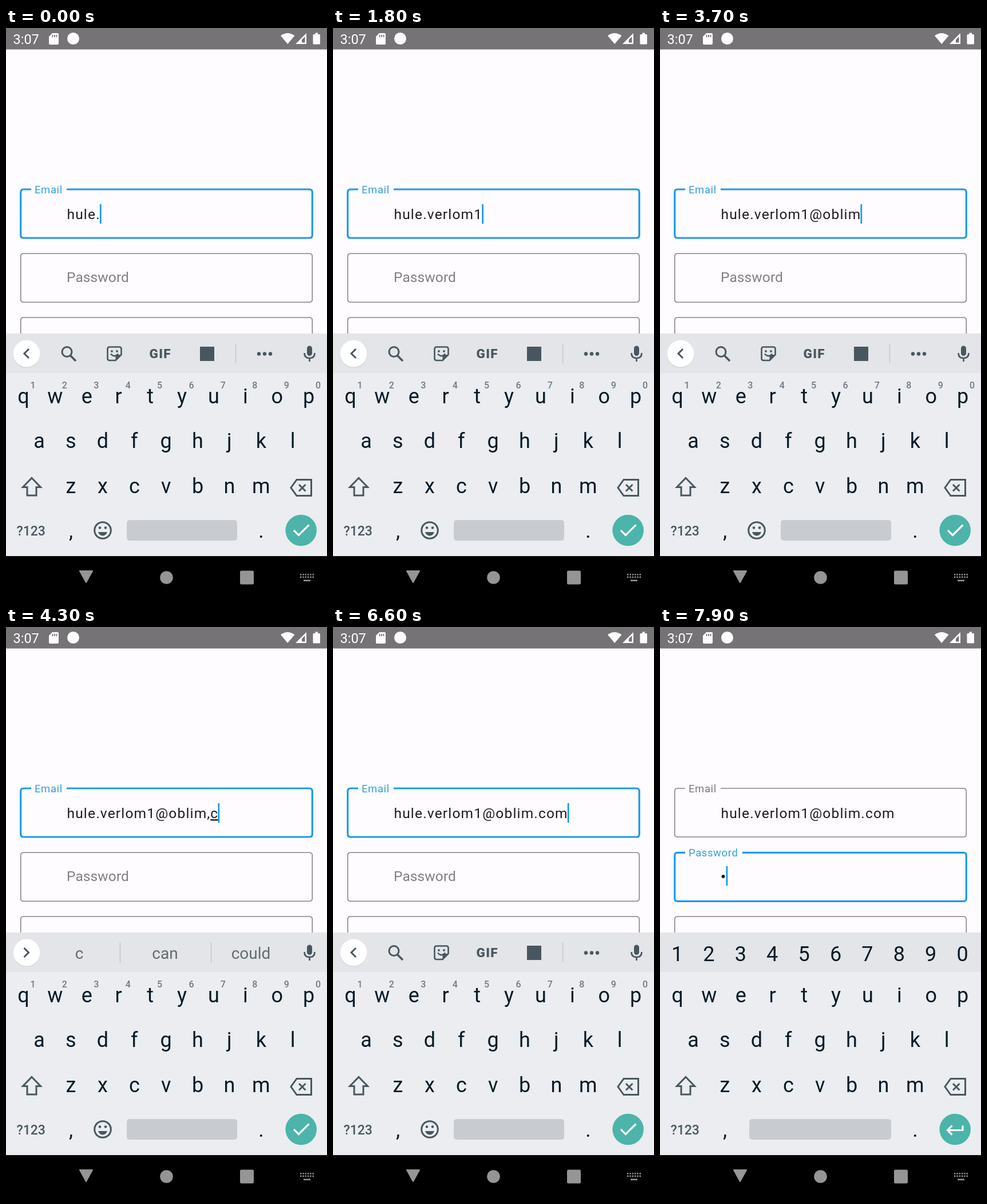
These frames come from a looping animation (561x998 px, 8000 ms). An HTML page:

```html
<!DOCTYPE html>
<html lang="en">
<head>
<meta charset="utf-8">
<title>Sign-in form</title>
<style>
  html, body { margin: 0; width: 100%; height: 100%; overflow: hidden; background: #fefcff; }
  svg { display: block; width: 561px; height: 998px; font-family: Roboto, sans-serif; }
  .mid { text-anchor: middle; }
  .key { font-size: 36px; fill: #061b27; }
  .hint { font-size: 16px; font-weight: 500; fill: #707a80; }
  .word { font-size: 28px; fill: #626b70; }
  .icon { fill: #48575f; }
  .line { fill: none; stroke: #48575f; stroke-width: 3; }
  .rule { stroke: #c5c9cc; stroke-width: 1.6; }
  .typed { font-size: 24.5px; letter-spacing: 1.17px; fill: #1d1b1f; }
  .label { font-size: 18.4px; letter-spacing: .65px; }
  .comp { text-decoration: underline; text-decoration-thickness: 1.5px; }
</style>
</head>
<body>
<svg id="stage" viewBox="0 0 561 998">
  <rect width="561" height="998" fill="#fefcff"/>

  <g id="status" fill="#fff">
    <rect width="561" height="37.5" fill="#757375"/>
    <text x="12.5" y="27.5" font-size="23.5">3:07</text>
    <path d="M81 9H90Q92 9 92 11V27Q92 29 90 29H77Q75 29 75 27V15Z"/>
    <path d="M81.5 12v4M85 12v4M88.5 12v4" stroke="#757375" stroke-width="1.8"/>
    <circle cx="117.5" cy="18.5" r="10.5"/>
    <path d="M480 13.5Q492 4.500 504.500 13.500L492.200 28Z"/>
    <path d="M525 9V28H506Z"/>
    <path d="M522.500 15V25.500H517V20.500Z" fill="#757375"/>
    <path d="M540.500 8.500h4.500v2.500h2.500q1.500 0 1.500 1.500V27q0 1.500-1.500 1.500h-9.500q-1.500 0-1.500-1.500V12.500q0-1.500 1.500-1.500h2.500z"/>
  </g>

  <path id="mailBox" fill="none"/>
  <path id="passBox" fill="none"/>
  <path id="nextBox" fill="none" stroke="#858388" stroke-width="1.6"/>
  <text id="mailLabel" class="label" x="50" y="288.500">Email</text>
  <text id="passLabel">Password</text>
  <text class="typed" id="mail" x="106.500" y="334"><tspan id="plain"></tspan><tspan id="comp" class="comp"></tspan></text>
  <circle id="bullet" cx="110.500" cy="436" r="3" fill="#1d1b1f"/>
  <rect id="caret" width="2.800" height="34" fill="#1c9ae9"/>

  <rect y="534" width="561" height="389" fill="#ebedf0"/>
  <rect y="534" width="561" height="69" fill="#e3e5e8"/>

  <g id="chip">
    <circle cx="36" cy="570" r="24" fill="#d5d8db"/>
    <circle cx="36" cy="569" r="23.500" fill="#fff"/>
    <path id="chevron" class="line"/>
  </g>
  <g id="tools">
    <circle cx="106.500" cy="566" r="8.500" class="line"/>
    <path class="line" d="M112.500 572.500L122 582" style="stroke-width:3.600"/>
    <path class="line" d="M181 557.500H198Q201.500 557.500 201.500 561V571L191.500 581H181Q177.500 581 177.500 577.500V561Q177.500 557.500 181 557.500Z" style="stroke-width:2.600"/>
    <path class="icon" d="M201.500 571L191.500 581V574.500Q191.500 571 195 571Z"/>
    <path class="line" d="M183 569.500Q189.500 577 196 569.500" style="stroke-width:2.400"/>
    <circle class="icon" cx="185" cy="565" r="1.900"/><circle class="icon" cx="194" cy="565" r="1.900"/>
    <text class="icon" x="250.500" y="577" font-size="22.500" font-weight="900" letter-spacing="1.300">GIF</text>
    <rect class="icon" x="339" y="557" width="25" height="25"/>
    <path class="rule" d="M401.500 552V586"/>
    <g class="icon"><circle cx="442" cy="569.500" r="3.200"/><circle cx="452" cy="569.500" r="3.200"/><circle cx="462" cy="569.500" r="3.200"/></g>
  </g>
  <g id="words">
    <path class="rule" d="M199.500 551V587M358.500 551V587"/>
  </g>
  <g id="mic">
    <rect class="icon" x="526" y="555.500" width="9" height="17.500" rx="4.500"/>
    <path class="line" d="M521.500 568Q521.500 577 530.500 577T539.500 568M530.500 577V583" style="stroke-width:2.700"/>
  </g>
  <g id="digits"></g>
  <g id="hints"></g>
  <g id="keys"></g>

  <path class="line" d="M45 786.500L60.500 802.500H53V817H37V802.500H29.500Z"/>
  <path class="line" d="M508 789.500H533.500V817.500H508L498 803.500Z"/>
  <path class="line" d="M512 798L523.500 809.500M523.500 798L512 809.500"/>
  <text class="icon" x="18.500" y="886.500" font-size="23" font-weight="500">?123</text>
  <g id="smile">
    <circle cx="169" cy="878" r="14.300" class="line"/>
    <g class="icon"><circle cx="164" cy="873.500" r="2.300"/><circle cx="174" cy="873.500" r="2.300"/><path d="M161 881H177Q174.500 887.500 169 887.500T161 881Z"/></g>
  </g>
  <rect id="space" y="860" height="36" rx="5" fill="#c8cbd0"/>
  <circle cx="515.700" cy="878" r="27.300" fill="#4cb4aa"/>
  <path id="action" fill="none" stroke="#fff" stroke-width="3.200"/>

  <rect y="923" width="561" height="75" fill="#000"/>
  <g id="nav" fill="#959595">
    <path d="M129 949H151L140 969Z" stroke="#959595" stroke-width="2" stroke-linejoin="round"/>
    <circle cx="280.500" cy="960.500" r="11.300"/>
    <rect x="409" y="948.500" width="24" height="24" rx="2.500"/>
    <path d="M520 964.500H532V967H520Z"/>
  </g>
</svg>
<script>
const LOOP = 8000, FOCUS = 7400, DOT = 7800, FLOAT = 170;
const BLUE = '#1c9ae9', GREY = '#858388';
const $ = id => document.getElementById(id);

function add(parent, tag, attrs, text = '') {
  const el = document.createElementNS('http://www.w3.org/2000/svg', tag);
  for (const k in attrs) el.setAttribute(k, attrs[k]);
  el.textContent = text;
  return $(parent).appendChild(el);
}
const set = (id, attrs) => { for (const k in attrs) $(id).setAttribute(k, attrs[k]); };
const show = (id, on) => { $(id).style.display = on ? '' : 'none'; };

// Keyboard rows: letters, first centre, baseline
const PITCH = 55.4;
function row(parent, chars, x, y, cls = 'key') {
  [...chars].forEach((c, i) => add(parent, 'text', { x: x + i * PITCH, y, class: cls + ' mid' }, c));
}
row('keys', 'qwertyuiop', 30.5, 655.5);
row('keys', 'asdfghjkl', 58, 734);
row('keys', 'zxcvbnm', 113.5, 813);
row('keys', ',', 113.5, 891);
row('keys', '.', 446, 891);
row('digits', '1234567890', 30, 584);
row('hints', '1234567890', 47, 630, 'hint');
const words = [128, 278, 428].map(x => add('words', 'text', { x, y: 580, class: 'word mid' }));
for (let r = 0; r < 2; r++)
  for (let i = 0; i < 6; i++)
    add('nav', 'rect', { x: 514 + i * 4.3, y: 954 + r * 4.5, width: 2.5, height: 2.5 });

// Outline with an optional gap in its top edge
function box(y, h, gapEnd) {
  const l = 25.7, r = 535.3, b = y + h, c = 5;
  const top = gapEnd ? `M${gapEnd} ${y}` : `M${l + c} ${y}`;
  const end = gapEnd ? 'H44' : 'Z';
  return `${top}H${r - c}Q${r} ${y} ${r} ${y + c}V${b - c}Q${r} ${b} ${r - c} ${b}` +
    `H${l + c}Q${l} ${b} ${l} ${b - c}V${y + c}Q${l} ${y} ${l + c} ${y}${end}`;
}
set('mailBox', { d: box(282, 85, 106) });
set('nextBox', { d: box(506, 86) });

// Typing: time, text, length of the composing word, suggestions
const NEXT = 'to I you';
const steps = [[0, 'hule.', 0, '']];
function type(chars, times) {
  [...chars].forEach((c, i) => steps.push([times[i], steps.at(-1)[1] + c, 0, '']));
}
type('verlom1', [500, 700, 900, 1000, 1200, 1300, 1700]);
type('@oblim', [2200, 2400, 3400, 3500, 3600, 3700]);
const mail = steps.at(-1)[1];
steps.push(
  [3900, mail + ',', 0, NEXT],
  [4200, mail + ',c', 1, 'c can could'],
  [4400, mail + ',co', 2, 'co could come'],
  [4600, mail + ',com', 3, 'com come comes'],
  [4800, mail + ',co', 2, 'co could come'],
  [4900, mail + ',c', 1, 'c can could'],
  [5100, mail + ',', 0, NEXT],
  [5400, mail, 0, '']
);
type('.com', [5700, 5900, 6000, 6200]);

const mix = (a, b, k) => a + (b - a) * k;

function draw(t) {
  const [at, text, comp, offer] = steps.findLast(s => s[0] <= t);
  const pass = t >= FOCUS, dot = t >= DOT;

  const cut = text.length - comp;
  $('plain').textContent = text.slice(0, cut);
  $('comp').textContent = text.slice(cut);

  set('mailBox', { stroke: pass ? GREY : BLUE, 'stroke-width': pass ? 1.6 : 3.2 });
  set('mailLabel', { fill: pass ? '#7d7b80' : '#359fdb' });
  set('passBox', {
    d: box(394.3, 85, pass ? 144 : 0),
    stroke: pass ? BLUE : GREY, 'stroke-width': pass ? 3.2 : 1.6
  });

  const p = Math.min(1, Math.max(0, (t - FOCUS) / FLOAT));
  const k = p * p * (3 - 2 * p);
  set('passLabel', {
    x: mix(106, 50, k), y: mix(444, 400.8, k), fill: pass ? '#359fdb' : '#827f84',
    'font-size': mix(24.5, 18.4, k), 'letter-spacing': mix(0.1, 0.65, k)
  });

  const last = dot ? DOT : pass ? FOCUS : at;
  show('caret', (t - last) % 1000 < 500);
  set('caret', {
    x: pass ? (dot ? 115.5 : 106) : 105.6 + $('mail').getComputedTextLength(),
    y: pass ? 418 : 308
  });
  show('bullet', dot);

  const list = offer ? offer.split(' ') : [];
  words.forEach((w, i) => { w.textContent = list[i] || ''; });
  show('words', !pass && offer);
  show('tools', !pass && !offer);
  show('chip', !pass);
  show('mic', !pass);
  show('hints', !pass);
  show('smile', !pass);
  show('digits', pass);
  set('chevron', { d: offer ? 'M31.5 561L39.500 569L31.500 577' : 'M40 561L32 569L40 577' });
  set('space', { x: pass ? 156 : 211, width: pass ? 248 : 193 });
  set('action', {
    d: pass ? 'M529 871.500V879.500H503M510.500 871.500L502.500 879.500L510.500 887.500'
            : 'M503 878L511.500 886.500L529.500 868.500'
  });
}

const start = performance.now();
function tick() {
  draw((performance.now() - start) % LOOP);
  requestAnimationFrame(tick);
}
tick();
</script>
</body>
</html>
```
